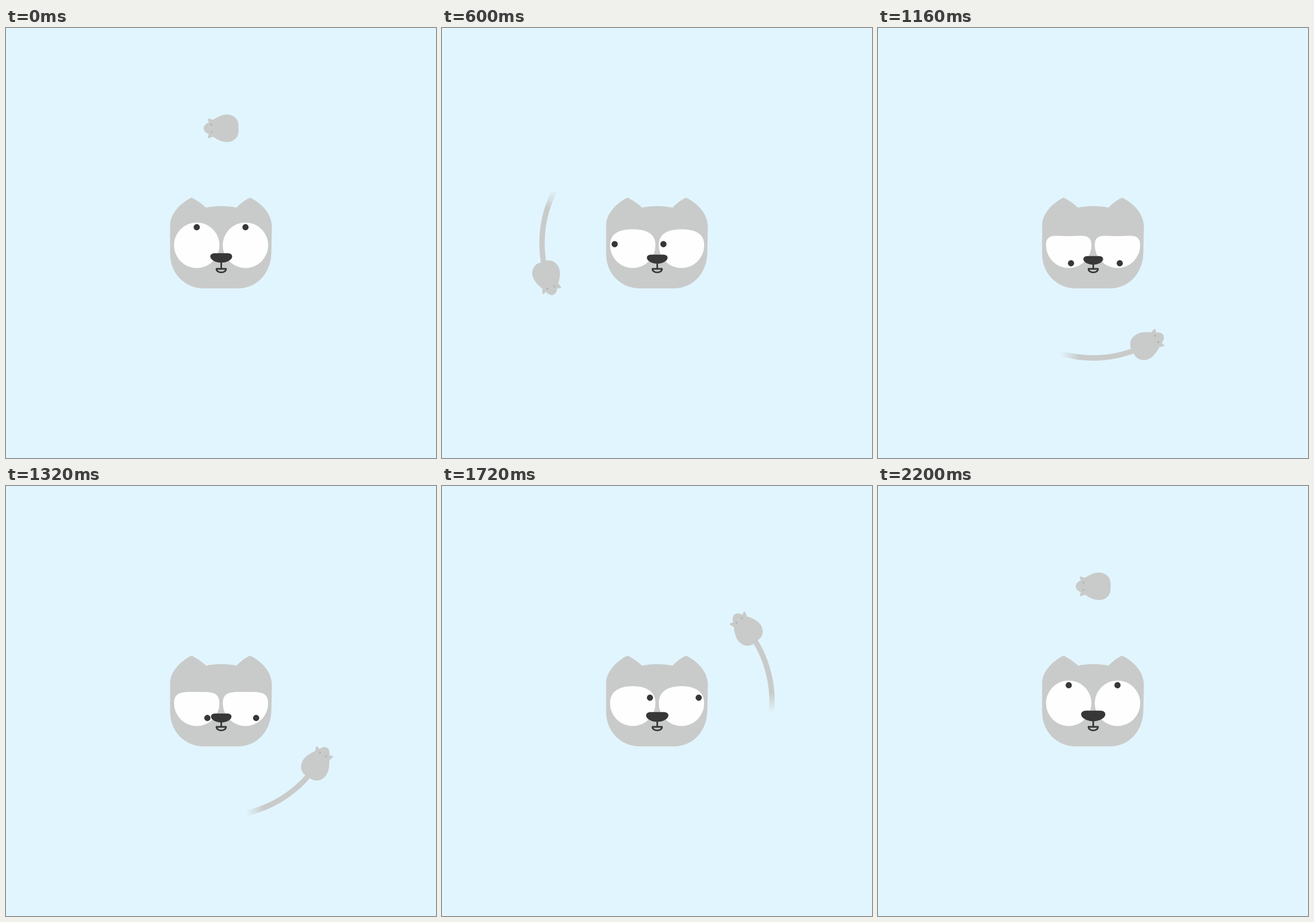
These frames come from a looping animation (748x748 px, 2.28 s). An HTML page with a canvas:

```html
<!DOCTYPE html>
<html lang="en">
<head>
<meta charset="utf-8">
<title>Cat watching a mouse</title>
<style>
  html, body { margin: 0; width: 100%; height: 100%; overflow: hidden; background: #e1f5fe; }
  canvas { display: block; }
</style>
</head>
<body>
<canvas id="stage" width="748" height="748"></canvas>
<script>
const ctx = document.getElementById('stage').getContext('2d');
const LOOP = 2280, STEP = 40, LAST = 2200, TURN = 2000;
const CENTER = 374, ORBIT = 200, TAU = Math.PI * 2;
const GREY = '#c9cbca', DARK = '#373737', WHITE = '#fefefe', SKY = '#e1f5fe';

const head = new Path2D(`M322.5 295 C331 299 341 305.5 348 312.5 C364 308.8 384 308.8 401 312.5
  C407 306 416 299 424.5 295 C445 305 462 323 462.5 345 L461.5 392 C460.5 426 437 453 403 453
  L345 453 C311 453 285.5 427 285.5 393 L285.5 343 C285.5 323 303 305 322.5 295Z`);
const nose = new Path2D(`M-10 -8.3 L10 -8.3 C15.5 -8.3 19 -6.5 19 -2.5 C19 3.5 9 8.3 0 8.3
  C-9 8.3 -19 3.5 -19 -2.5 C-19 -6.5 -15.5 -8.3 -10 -8.3Z`);
const mouth = new Path2D(`M374.4 405 V418.8 M366.2 418.8 Q374.4 419.2 382.6 418.8
  C383.2 422.6 379 425.2 374.4 425.2 C369.8 425.2 365.6 422.6 366.2 418.8Z`);
const mouseHalf = new Path2D(`M-30 0 C-30 -5 -26 -8 -21 -10.5 C-22.5 -13 -23.3 -15 -22.8 -17
  C-20 -16.8 -17 -16.2 -14 -14.6 C-7 -19.5 2 -24 10 -24 C22 -24 30.5 -16 30.5 -5 L30.5 .5 L-30 .5Z`);

const clamp = v => Math.min(1, Math.max(0, v));
const turnAt = ms => clamp(ms / TURN) * TAU;

function fill(path, color) {
  ctx.fillStyle = color;
  ctx.fill(path);
}

function dot(x, y, r, color) {
  const p = new Path2D();
  p.arc(x, y, r, 0, TAU);
  fill(p, color);
}

function drawTail(from, to) {
  if (to <= from) return;
  const deg = TAU / 360, tip = -Math.PI / 2 - from + 2 * deg;
  const fade = ctx.createConicGradient(tip - Math.PI, CENTER, CENTER);
  fade.addColorStop(0, GREY);
  fade.addColorStop(0.5 - 9.5 / 360, GREY);
  fade.addColorStop(0.5, 'rgba(201,203,202,0)');
  ctx.strokeStyle = fade;
  ctx.lineWidth = 9.4;
  ctx.beginPath();
  ctx.arc(CENTER, CENTER, ORBIT, tip, -Math.PI / 2 - to, true);
  ctx.stroke();
}

function drawMouse(angle) {
  ctx.save();
  ctx.translate(CENTER, CENTER);
  ctx.rotate(-angle);
  ctx.translate(0, 0.4 - ORBIT);
  for (const side of [1, -1]) {
    ctx.scale(1, side);
    fill(mouseHalf, GREY);
    dot(-16.6, -6.2, 1.7, '#b1b3b3');
  }
  ctx.restore();
}

// Only the top node of the eye moves; its handles stay fixed.
function drawEye(x, lid, gaze) {
  const y = 378, r = 39.5, k = 21.8, top = y - r + lid;
  const p = new Path2D();
  p.moveTo(x - r, y);
  p.bezierCurveTo(x - r, y - k, x - k, top, x, top);
  p.bezierCurveTo(x + k, top, x + r, y - k, x + r, y);
  p.arc(x, y, r, 0, Math.PI);
  fill(p, WHITE);
  return () => dot(x - 31.5 * Math.sin(gaze), y - 31.5 * Math.cos(gaze), 5.4, DARK);
}

function drawCat(ms) {
  const gaze = turnAt(ms);
  const turn = gaze / TAU;
  const low = 1 - Math.abs(1 - 2 * turn);
  fill(head, GREY);
  const pupils = [331.8, 416.6].map(x => drawEye(x, 24.6 * low, gaze));

  ctx.strokeStyle = DARK;
  ctx.lineWidth = 2.8;
  ctx.lineJoin = 'round';
  ctx.stroke(mouth);

  const width = turn < 0.5 ? 38 - 4 * low : 42 - 8 * low;
  ctx.save();
  ctx.translate(374.4, 400 + 4.4 * low);
  ctx.scale(width / 38, width / 38);
  fill(nose, DARK);
  ctx.restore();
  pupils.forEach(draw => draw());
}

function frame(now) {
  const ms = Math.min(LAST, Math.floor(now % LOOP / STEP) * STEP);
  ctx.fillStyle = SKY;
  ctx.fillRect(0, 0, 748, 748);
  drawTail(turnAt(ms - 240), turnAt(ms));
  drawMouse(turnAt(ms));
  drawCat(ms - 120);
}

const start = performance.now();
function tick() {
  frame(performance.now() - start);
  requestAnimationFrame(tick);
}
tick();
</script>
</body>
</html>
```
